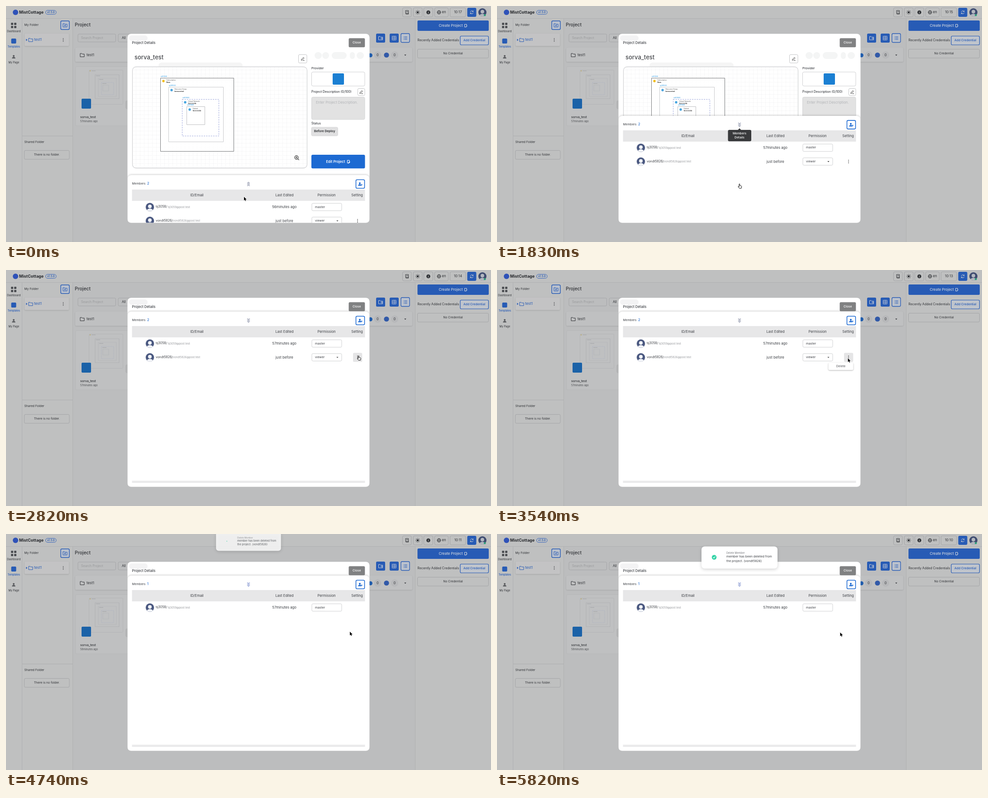
Recreate the animation shown at these times as an HTML page with a canvas. Size 1072 by 522 pixels, loop 5850 ms.

```html
<!DOCTYPE html>
<html lang="en">
<head>
<meta charset="utf-8">
<title>Project members</title>
<style>
html, body { margin: 0; width: 100%; height: 100%; overflow: hidden; background: #bebfc0; }
canvas { display: block; width: 1072px; height: 522px; }
</style>
</head>
<body>
<canvas id="stage"></canvas>
<script>
const W = 1072, H = 522, LOOP = 5850, STEP = 30;
const canvas = document.getElementById('stage');
const c = canvas.getContext('2d');
const dpr = window.devicePixelRatio || 1;
canvas.width = W * dpr;
canvas.height = H * dpr;

const DIM_BLUE = '#275bb5', BLUE = '#1d6ad2', INK = '#3c3f44', DIM_INK = '#2f3135';
const DIM_LINE = '#a5a6a8', NAVY = '#3f4c70';
const PROJECT = 'sorva_test';
const MEMBERS = [
  { name: 'tij3058', mail: 'tij3059@post.test', mailX: 357.5, role: 'master' },
  { name: 'vondt5826', mail: 'vondt5826@post.test', mailX: 369, role: 'viewer' }
];

const clamp = v => Math.max(0, Math.min(1, v));
const span = (t, from, to) => clamp((t - from) / (to - from));
const mix = (a, b, k) => a + (b - a) * k;

function bezier(x1, y1, x2, y2) {
  const at = (a, b, s) => 3 * a * s * (1 - s) ** 2 + 3 * b * s * s * (1 - s) + s ** 3;
  return x => {
    let lo = 0, hi = 1;
    for (let i = 0; i < 24; i++) {
      const mid = (lo + hi) / 2;
      if (at(x1, x2, mid) < x) lo = mid; else hi = mid;
    }
    return at(y1, y2, lo);
  };
}
const ease = bezier(.25, .1, .25, 1);
const toastEase = bezier(.21, 1.02, .73, 1);
const glide = bezier(.4, 0, .3, 1);

// Drawing helpers
function box(x, y, w, h, r, fill, stroke, lw = 1) {
  c.beginPath();
  c.roundRect(x, y, w, h, r);
  if (fill) { c.fillStyle = fill; c.fill(); }
  if (stroke) { c.strokeStyle = stroke; c.lineWidth = lw; c.stroke(); }
}
function dot(x, y, r, fill, stroke, lw = 1) {
  c.beginPath();
  c.arc(x, y, r, 0, 7);
  if (fill) { c.fillStyle = fill; c.fill(); }
  if (stroke) { c.strokeStyle = stroke; c.lineWidth = lw; c.stroke(); }
}
function text(s, x, y, size, color = INK, weight = 400, align = 'left') {
  c.font = `${weight} ${size}px Inter, Roboto, sans-serif`;
  c.textAlign = align;
  c.textBaseline = 'middle';
  c.fillStyle = color;
  c.fillText(s, x, y);
}
function icon(d, x, y, stroke, lw = 1, fill) {
  const p = new Path2D(d);
  c.save();
  c.translate(x, y);
  c.lineJoin = c.lineCap = 'round';
  if (fill) { c.fillStyle = fill; c.fill(p); }
  if (stroke) { c.strokeStyle = stroke; c.lineWidth = lw; c.stroke(p); }
  c.restore();
}
function shaded(blur, dy, alpha, draw) {
  c.save();
  c.shadowColor = `rgba(0,0,0,${alpha})`;
  c.shadowBlur = blur * dpr;
  c.shadowOffsetY = dy * dpr;
  draw();
  c.restore();
}

const FOLDER = 'M-4.5 3.5V-3.5H-1L.2-2.2H4.5V3.5Z';
const PENCIL = 'M-3 3L-2.6 1L1.6-3.2L3.2-1.6L-1 2.6ZM.5 3.6H3.6';
const NOTE = 'M2.5-3H-2V3H0M2.5-3V-.2M3 0L.4 2.8V3.4H1.2L3.6 1Z';
const CARET = 'M-2.2-1H2.2L0 1.4Z';
const PERSON = 'M-2-1.6A2 2 0 1 1 2-1.6A2 2 0 1 1-2-1.6M-3.8 4C-3.8-.2 3.8-.2 3.8 4Z';
const ARROW = 'M0 0V8.2L1.9 6.5L3.2 9.4L4.5 8.8L3.3 6H5.9Z';
const HAND = 'M-1 0C-.8-.9.6-.9.8 0V3.2L3.4 3.8C4.6 4.1 4.9 4.7 4.7 5.9L4 9.2H-.4L-2.8 6C-3.4 5 -2.4 4.3-1.6 5L-1 5.6Z';

function kebab(x, y, color) {
  for (const d of [-3, 0, 3]) dot(x, y + d, .85, color);
}
function avatar(x, y, r, back, skin) {
  c.save();
  dot(x, y, r, back);
  c.clip();
  dot(x, y - r * .16, r * .44, skin);
  c.beginPath();
  c.ellipse(x, y + r * .95, r * .76, r * .6, 0, 0, 7);
  c.fillStyle = skin;
  c.fill();
  c.restore();
}
function chevrons(x, y, dir, color) {
  for (const o of [-3, 0, 3]) icon(`M-2.4 ${-dir}L0 ${dir}L2.4 ${-dir}`, x, y + o, color, 1);
}

function drawHeader(t) {
  dot(21, 14, 6, '#2f52b8');
  text('MistCottage', 29, 14, 9, '#26282c', 700);
  box(87.5, 9.5, 23.5, 9, 4.5, null, '#3d69bd', 1);
  text('v1.5.0', 99.3, 14.2, 5.9, DIM_BLUE, 600, 'center');

  for (const [x, w] of [[876.5, 19.5], [900.5, 19.5], [923.5, 20], [947.5, 30], [981.5, 34.5]])
    box(x, 4, w, 20, 3, null, DIM_LINE, 1);
  icon('M-3-4H3V4H-2.2Q-3 4-3 3ZM-3 2.2H3M-1-1.5H1.2', 886.5, 14, DIM_INK);
  dot(910, 14, 2.3, DIM_INK);
  for (let i = 0; i < 8; i++) {
    c.save();
    c.translate(910, 14);
    c.rotate(i * Math.PI / 4);
    icon('M3.6 0H4.5', 0, 0, DIM_INK, 1);
    c.restore();
  }
  dot(933.5, 14, 4.3, DIM_INK);
  icon('M0-.3V2M0-2V-1.9', 933.5, 14, '#c0c0c0', 1.1);
  dot(957, 14, 3.9, null, DIM_INK, .9);
  icon('M-4 0H4M0-4C-2.4-1.5-2.4 1.5 0 4C2.4 1.5 2.4-1.5 0-4', 957, 14, DIM_INK, .8);
  text('en', 963.5, 14, 7.7, DIM_INK);
  const ticks = t < 290 ? 0 : 1 + Math.floor((t - 290) / 870);
  text('10:' + (17 - ticks), 999, 14, 7.6, DIM_INK, 400, 'center');
  box(1019.5, 4, 20, 20, 3, DIM_BLUE);
  icon('M-3.2-1A3.4 3.4 0 0 1 2.8-2M3.2-3.5V-1.5H1.2M3.2 1A3.4 3.4 0 0 1-2.8 2M-3.2 3.5V1.5H-1.2', 1029.5, 14, '#c8cbd0', 1);
  avatar(1053, 14, 9, NAVY, '#b4b8c0');
  dot(1058.3, 20.3, 2.3, '#2c9f78');
}

function drawSidebar() {
  for (const [dx, dy] of [[-6, -6], [1, -6], [-6, 1], [1, 1]])
    box(17 + dx, 43 + dy, 5, 5, 1.3, '#4c4e52');
  text('Dashboard', 17.3, 56, 5.8, DIM_INK, 400, 'center');
  box(11.5, 72, 11, 11, 2, DIM_BLUE);
  text('Templates', 17.3, 90.5, 5.6, DIM_BLUE, 500, 'center');
  icon(PERSON, 17, 112, null, 1, '#55575b');
  text('My Page', 17.3, 125, 5.7, DIM_INK, 400, 'center');

  text('My Folder', 40.5, 42, 6.7, DIM_INK);
  box(121, 33, 19, 19, 2.5, '#b9c0cc', DIM_BLUE, 1.4);
  icon(FOLDER + 'M0-1V2.2M-1.6.6H1.6', 130.5, 42.5, DIM_BLUE, 1);
  shaded(3, 1, .15, () => box(41, 61, 98, 27.5, 2, '#c3c3c4'));
  icon('M-1.2-2.6V2.6L1.8 0Z', 45.5, 75, null, 1, DIM_BLUE);
  icon(FOLDER, 54.5, 75, DIM_BLUE, 1);
  text('test1', 62, 75, 7.9, DIM_BLUE);
  kebab(126.5, 75, DIM_INK);
  box(36, 287, 111, 1, 0, '#acadaf');
  text('Shared Folder', 40.5, 301, 6.7, DIM_INK);
  box(40.5, 319.5, 99.5, 19.5, 2.5, null, DIM_LINE);
  text('There is no folder.', 90.3, 329, 6.7, DIM_INK, 400, 'center');
}

function drawThumb() {
  box(183.5, 141.5, 75, 76, 2, '#bfc0c1', '#b1b2b4', .7);
  const frame = (x, y, s, color, dash = []) => {
    c.setLineDash(dash);
    box(x, y, s, s, 0, null, color, .5);
    c.setLineDash([]);
  };
  frame(197, 152, 53, '#a0a1a4');
  frame(204, 160, 40, '#adaeb0');
  frame(211, 169, 27, '#98a0bc', [2, 1.5]);
  frame(214, 175, 13, '#abacb0');
  dot(186, 143.5, .9, '#b89a3a');
  for (const [x, y] of [[189, 143], [199, 154], [206, 162], [213, 171]])
    box(x, y, 9, 1, 0, '#a3a5a8');
}

function drawMain(t) {
  text('Project', 152, 42, 10.4, DIM_INK, 500);
  box(159, 62, 83.5, 17.5, 2.5, null, DIM_LINE);
  text('Search Project', 166, 71, 7, '#98999b');
  box(248, 62, 60, 17.5, 2.5, null, DIM_LINE);
  text('All', 256, 71, 7.3, DIM_INK);
  box(818, 61, 20, 20, 2.5, DIM_BLUE);
  icon(FOLDER + 'M1 .8A1.4 1.4 0 1 0 3.8.8A1.4 1.4 0 1 0 1 .8', 828, 71, '#c9ced8', 1);
  box(848, 61, 20, 20, 2.5, DIM_BLUE);
  icon('M-4-4H4V4H-4ZM0-4V4M-4 0H4', 858, 71, '#c9ced8', 1);
  box(873, 61, 19, 19.5, 2.5, '#bcc2cc', DIM_BLUE, 1.3);
  icon('M-2-3H4M-2 0H4M-2 3H4M-4-3H-3.9M-4 0H-3.9M-4 3H-3.9', 882.5, 71, DIM_BLUE, 1);

  shaded(3, 1, .12, () => box(153, 92, 745, 31.5, 3, '#bfc0c1'));
  icon(FOLDER, 168.5, 108.5, DIM_INK, 1);
  text('test1', 178, 108.7, 7.9, DIM_INK);
  dot(805.5, 109, 4.5, '#1f5cac');
  dot(841, 108.5, 5.6, '#3159a8');
  for (const x of [821.5, 859]) {
    dot(x, 108.5, 8, '#b7b8ba');
    text('0', x, 108.7, 7.6, DIM_INK, 400, 'center');
  }
  icon(CARET, 882.5, 108.5, null, 1, DIM_INK);

  box(153.5, 134, 130, 131, 3, '#bfc0c1', '#b4b5b7', .8);
  drawThumb();
  box(264, 209, 20, 19, 4, '#b3b4b5');
  box(167, 205, 21, 22, 2, '#1b62a8');
  text(PROJECT, 164, 246, 7, DIM_INK, 500);
  text((t < 4410 ? 57 : 58) + 'minutes ago', 164, 255, 5.6, '#4b4d50');
}

function drawAside() {
  box(909.5, 32, 157.5, 23, 2.5, DIM_BLUE);
  text('Create Project', 956.5, 43.6, 7.8, '#d0d5de', 500);
  icon(NOTE, 1015.5, 43.5, '#d0d5de', 1);
  text('Recently Added Credentials', 909.5, 76, 7, DIM_INK);
  box(1004, 66.5, 62.5, 19.5, 2.5, '#bfc4cc', DIM_BLUE, 1.2);
  text('Add Credential', 1035.2, 76.3, 6.8, DIM_BLUE, 500, 'center');
  box(909.5, 95.5, 157, 19.5, 2.5, null, DIM_LINE);
  text('No Credential', 988, 105.3, 6.7, DIM_INK, 400, 'center');
}

function node(x, y, s, color, label, title, value, mark, dash = []) {
  c.setLineDash(dash);
  box(x - .5, y - .5, s, s, 0, '#ffffffcc', color, 1);
  c.setLineDash([]);
  text(label, x, y - 3.6, 3.4, '#2796e0', 500);
  dot(x + 6, y + 6, 2.7, mark);
  text(title, x + 12.5, y + 4.3, 3.5, '#4a4a4a');
  text(value, x + 12.5, y + 9, 3.3, '#222', 700);
}

function drawDiagram() {
  c.save();
  box(279.5, 134.5, 386, 224, 8, '#fff');
  c.clip();
  c.setLineDash([1, 1]);
  c.strokeStyle = '#ededee';
  c.lineWidth = .8;
  c.beginPath();
  for (let x = 287.5; x < 666; x += 9) { c.moveTo(x, 134); c.lineTo(x, 359); }
  for (let y = 141.5; y < 359; y += 9) { c.moveTo(279, y); c.lineTo(666, y); }
  c.stroke();
  c.restore();
  box(279.5, 134.5, 386, 224, 8, null, '#d2d3d5', 1.3);
  node(342, 160, 162, '#76787a', 's001000', 'Subscription', 'None', '#f2bd1d');
  node(360, 180, 121, '#c9cacc', 'rg101000', 'Resource Group', 'koreacentral', '#4aa3dc');
  node(390, 207, 81, '#9aa4da', 'vn101000', 'Virtual Network', '10.0.0.0/16', '#45a5e0', [3, 2.2]);
  node(400, 223, 40, '#bfc0c3', 'sn101000', 'Subnet', '10.0.0.0/24', '#45a5e0');
  dot(642, 335, 3.9, null, '#333', 1.2);
  icon('M3 3L5.4 5.4M-1.8 0H1.8M0-1.8V1.8', 642, 335, '#333', 1.2);
}

function drawDetails() {
  for (const [x, w] of [[682, 16], [699, 15], [720, 33], [760, 11], [775, 16]])
    box(x, 102, w, 15, 7.5, '#f4f5f5');
  box(337, 125, 186, 14, 7, '#f5f5f5');
  text(PROJECT, 284, 114.3, 13, '#46484c', 500);
  box(646.5, 107.5, 18.5, 18.5, 2.5, '#fff', '#c5c6c8');
  icon(PENCIL, 655.8, 116.8, '#444', 1);
  drawDiagram();
  text('Provider', 675, 138, 6.8, INK, 500);
  box(675.5, 146, 117.5, 31, 3, '#fff', '#cfd0d2');
  box(722, 149, 25, 25, 2, '#1b7fd2');
  text('Project Description (0/100)', 675, 190, 6.9, INK, 500);
  box(777.5, 182.5, 15.5, 15.5, 2.5, '#fff', '#c5c6c8');
  icon(PENCIL, 785, 190.2, '#444', 1);
  box(675.5, 201.5, 117.5, 49.5, 3, '#e2e2e2', '#d4d5d6');
  text('Enter Project Description.', 685, 213.7, 7.7, '#b2b4b7');
  text('Status', 675, 260.3, 6.9, INK, 500);
  box(675, 268, 58.5, 19.3, 3, '#e0e0e1', '#d3d3d4', .7);
  text('Before Deploy', 704.2, 277.3, 6.8, '#26282b', 600, 'center');
  box(675, 329, 118.5, 30.3, 3, BLUE);
  text('Edit Project', 707.5, 344.5, 7.6, '#fff', 600);
  icon(NOTE, 756.5, 344.3, '#fff', 1.1);
}

function drawRow(m, y, edited, t) {
  const first = m === MEMBERS[0];
  dot(318, y, 10, '#e9eaee');
  avatar(318, y, 9.1, '#4a5880', '#f2f4f8');
  text(m.name + '/', 331, y - .3, 6.9, '#3a3d42');
  text(m.mail, m.mailX, y + .5, 5.9, '#96989c');
  text(edited, 615.3, y + .3, 7.75, INK, 400, 'center');
  box(676, y - 8.3, 66, 16.4, 2.5, '#fff', '#cfd0d2');
  text(m.role, 683, y - .2, 6.8, INK);
  if (first) return;
  icon(CARET, 732.5, y, null, 1, '#444');
  if (t >= 2520) box(767, y - 10, 20.3, 20, 2.5, '#e5e5e6');
  kebab(777, y, '#444');
}

function drawPanel(t, top) {
  shaded(4, -1, .2, () => box(269, top, 534, 420, 8, '#fff'));
  const removed = t >= 4410;
  text('Members', 278.5, top + 19, 6.7, INK);
  text(removed ? '1' : '2', 312, top + 19, 7.2, BLUE, 500);
  chevrons(536, top + 19.7, t < 1714 ? -1 : 1, t < 3600 ? '#4b5578' : '#3b57b5');
  box(773.5, top + 10.2, 19, 19, 2.5, '#fff', BLUE, 1.6);
  icon(PERSON, 782, top + 19.5, null, 1, BLUE);
  icon('M-1.3 0H1.3M0-1.3V1.3', 786.3, top + 21.3, BLUE, .9);
  box(278.5, top + 32, 515, 25, 0, '#e7e7e8');
  for (const [s, x] of [['ID/Email', 422], ['Last Edited', 615.5], ['Permission', 708.5], ['Setting', 776]])
    text(s, x, top + 45, 7.7, INK, 400, 'center');
  drawRow(MEMBERS[0], top + 70.7, (t < 1714 ? 56 : 57) + 'minutes ago', t);
  if (!removed) drawRow(MEMBERS[1], top + 101.2, 'just before', t);
  box(278.5, top + 374, 515, 5, 0, '#ebebec');
}

function drawModal(t, top) {
  c.save();
  box(268.5, 61.5, 535, 418, 8, '#fff');
  c.clip();
  box(272, 65, 41, 12, 6, '#f3f3f4');
  if (top > 93) drawDetails();
  drawPanel(t, top);
  c.restore();
  text('Project Details', 278.5, 81.5, 7.5, INK, 500);
  box(757.5, 71.3, 35.8, 20, 2.5, '#808182');
  text('Close', 775.3, 81.4, 6.8, '#fff', 500, 'center');
}

function drawTooltip(t, top) {
  const alpha = span(t, 1250, 1350) * (1 - span(t, 1980, 2070));
  if (!alpha) return;
  c.save();
  c.globalAlpha = alpha;
  box(510.5, top + 31, 51.5, 25.3, 3, '#393a3c');
  icon('M-4 4L0 0L4 4Z', 536, top + 27.5, null, 1, '#393a3c');
  text('Members', 536, top + 39.3, 6.7, '#fff', 500, 'center');
  text('Details', 536, top + 48.3, 6.7, '#fff', 500, 'center');
  c.restore();
}

function drawMenu(t) {
  if (t < 3060 || t >= 4410) return;
  shaded(3, 1, .3, () => box(732.5, 205, 55, 16.3, 3, '#fff'));
  box(734.5, 207, 51, 12.3, 2, t >= 3720 ? '#e1e1e2' : '#fff');
  text('Delete', 760, 213, 6.8, '#55575b', 400, 'center');
}

function drawToast(t) {
  if (t < 4600) return;
  const k = toastEase(span(t, 4600, 5190));
  c.save();
  c.globalAlpha = mix(.5, 1, k);
  c.translate(536, 52 - 98 * (1 - k));
  c.scale(mix(.6, 1, k), mix(.6, 1, k));
  shaded(7, 2, .18, () => box(-84, -24.5, 168, 49, 7, '#fff'));
  const pop = ease(span(t, 4700, 4960));
  if (pop) {
    c.save();
    c.translate(-56, -.5);
    c.rotate((1 - pop) * Math.PI / 4);
    c.scale(pop, pop);
    dot(0, 0, 5.2, '#2fd2a4');
    if (t > 4900) icon('M-2.2.1L-.6 1.8L2.3-1.6', 0, 0, '#fff', 1.2);
    c.restore();
  }
  text('Delete Member', -29, -9.2, 5.6, '#77797d');
  text('member has been deleted from', -29, -1.8, 6.8, INK);
  text(`the project. (${MEMBERS[1].name})`, -29, 7.6, 6.8, INK);
  c.restore();
}

const PATH = [
  [0, 526, 422], [600, 525.5, 399], [660, 525.5, 399], [1170, 535, 396], [1260, 535, 396],
  [1500, 536, 396], [1740, 536, 394], [1890, 536, 394], [2430, 772, 203],
  [2640, 779.5, 190.3], [3420, 779.5, 190.3], [3900, 760, 216], [5819, 760, 216],
  [5820, 758.5, 217.8], [LOOP, 758.5, 217.8]
];
function drawCursor(t) {
  const i = PATH.findIndex(p => p[0] > t);
  const a = PATH[i - 1], b = PATH[i];
  const k = glide(span(t, a[0], b[0]));
  const x = mix(a[1], b[1], k), y = mix(a[2], b[2], k);
  const hand = (t >= 1680 && t < 1980) || (t >= 2520 && t < 3510);
  if (hand) {
    icon(HAND, x, y, '#111', 1, '#fff');
  } else {
    icon(ARROW, x, y, '#fff', 1.2);
    icon(ARROW, x, y, null, 1, '#000');
  }
}

function render(t) {
  c.setTransform(dpr, 0, 0, dpr, 0, 0);
  box(0, 0, W, H, 0, '#bfc0c0');
  box(147, 28, 757, 494, 0, '#bcbdbe');
  for (const [x, y, w, h] of [[0, 27, W, 1], [35, 28, 1, 494], [147, 28, 1, 494], [904, 28, 1, 494]])
    box(x, y, w, h, 0, '#b0b1b2');
  drawHeader(t);
  drawSidebar();
  drawMain(t);
  drawAside();
  const top = 374 - 282 * ease(span(t, 1714, 2134));
  drawModal(t, top);
  drawTooltip(t, top);
  drawMenu(t);
  drawToast(t);
  drawCursor(t);
}

const start = performance.now();
function tick() {
  const steps = Math.floor((performance.now() - start + 5) / STEP);
  render(steps * STEP % LOOP);
  requestAnimationFrame(tick);
}
tick();
</script>
</body>
</html>
```
